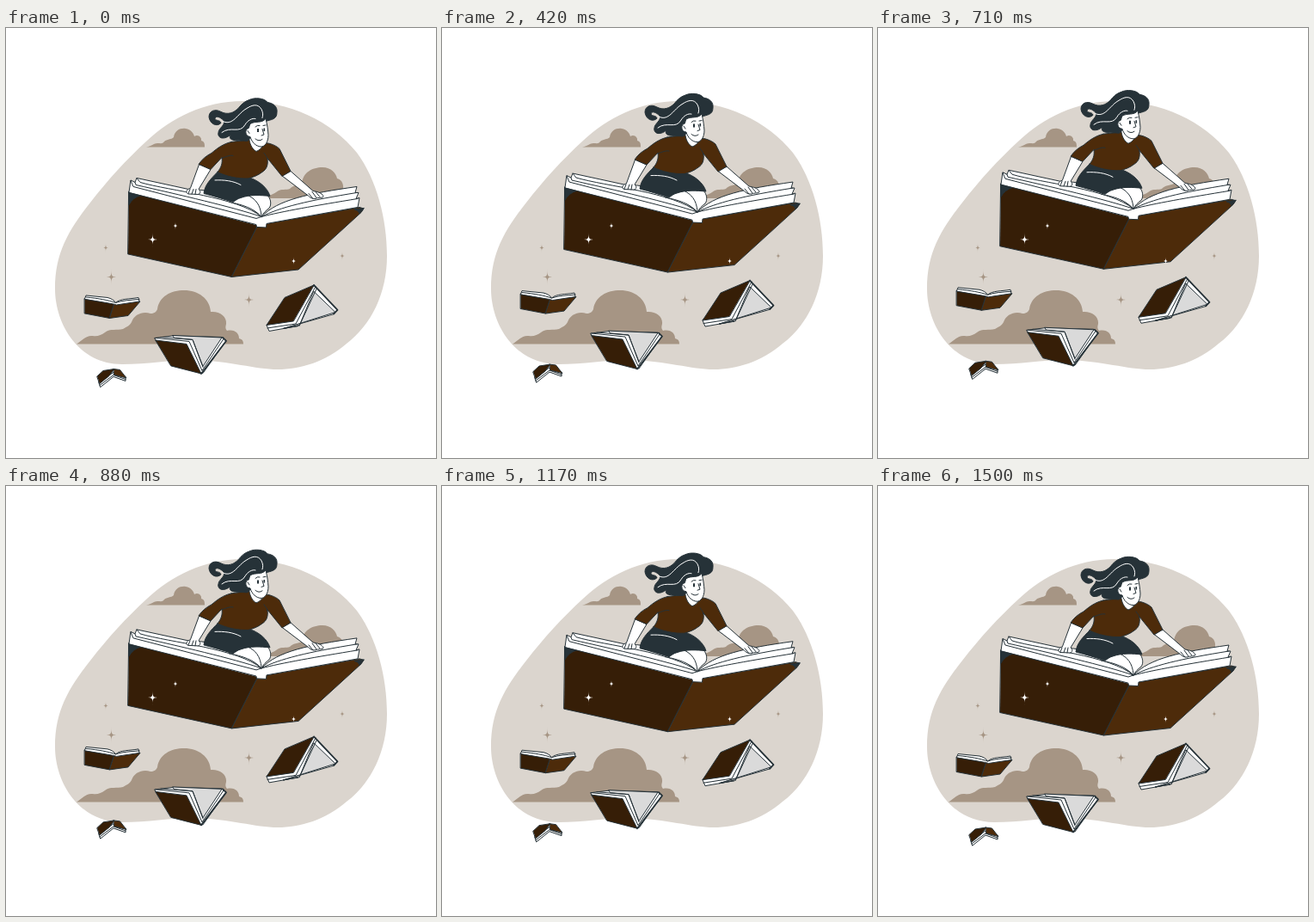
Recreate the animation shown at these times as an HTML page. Size 500 px wide and 500 px high, loop 1540 ms.

```html
<!DOCTYPE html>
<html lang="en">
<head>
<meta charset="utf-8">
<title>Flying books</title>
<style>
  html, body { margin: 0; width: 100%; height: 100%; overflow: hidden; background: #fff; }
  svg { display: block; width: 100%; height: 100%; }
  .cloud { fill: #a69584; }
  .ink { fill: #263238; }
  .line { fill: none; }
  .white { fill: #fff; }
  .cover { fill: #4d2b0a; }
  .shade { fill: #361e07; }
  .grey { fill: #dadada; }
  .edge { fill: none; stroke-width: 1.8; }
  #float { stroke: #263238; stroke-width: 1; stroke-linejoin: round; stroke-linecap: round; }
  .shine { fill: none; stroke: #fff; stroke-width: 1; }
</style>
</head>
<body>
<svg viewBox="0 0 500 500">
  <path fill="#dbd5ce" d="M57 303C57 262 72 236 98 203C118 177 140 153 164 131C192 105 230 85 275 85C330 85 378 108 408 145C431 176 443 222 443 265C443 308 425 345 396 367C372 388 342 397 316 397C290 397 260 387 220 386C190 386 165 391 135 391C85 391 57 345 57 303Z"/>

  <g class="cloud">
    <path d="M163 138.5C170 137 172 134 176 134C180 134 182 135 184 132C187 129 192 130 195 127C196 119 203 116 209 117C215 118 218 122 219 126C223 123 228 127 227 131C231 132 231 135 231 138.5Z"/>
    <path d="M300 198C306 194 310 194 314 191C320 186 326 189 330 187C333 183 340 183 344 181C345 168 356 162 368 162C378 162 384 169 385 175C391 176 394 184 391 190C394 192 394 195 394 198Z"/>
    <path d="M82 367.5C89 363 93 357 101 358C106 359 111 357 115 354C121 349 129 352 136 350C141 347 144 346 146 342C149 333 159 329 168 332C172 332 175 330 176 327C178 312 192 305 207 305C224 305 237 315 238 330C248 329 257 335 256 344C255 348 255 350 257 352C266 350 271 355 271 361C275 362 276 364 276 367.5Z"/>
  </g>
  <g id="dim" class="cloud"></g>

  <g id="float">
    <!-- large open book -->
    <path class="shade" d="M143 191L293 230L262.500 290L142 263.500Z"/>
    <path class="cover" d="M293 230L303 228L411 209L416 210.500L413 215L340 281.500L262.500 290Z"/>
    <path class="ink" d="M143 191L157 195Q147 198 143 206ZM416 210L405 211.500Q410 212 411 216Z"/>
    <path class="white" d="M143 191.500L145 177.500L150 180L152 175L212 188C236 188 270 196 297 220C316 200 352 193 408 185L406 192L410 192L407 199L411 198L409 209L303 228L302.500 232.500L291.500 232L291 229.500Z"/>
    <path class="line" d="M145 178L148 185L291 222L297 220M150 180L151 183C200 194 265 209 297 220M152 175L156 180C190 190 270 197 297 220M297 220C318 209 352 201 408 192M297 220C320 214 360 207 409 199"/>

    <!-- rider -->
    <path class="white" d="M260 203C267 196 286 193 304 195C308 199 309 206 306 210C302 213 299 216 297 220C288 210 275 206 260 203Z"/>
    <path class="line" d="M281 195C290 199 296 206 297 219"/>
    <path class="ink" d="M246 168C256 172 270 174 282 174C294 178 304 186 307 196C296 195 284 194 273 198C269 199 267 201 264 203C252 199 241 196 230 193C231 183 238 176 246 168Z"/>
    <path class="shine" d="M243 177.500C253 177 264 178 273 183"/>
    <path class="white" d="M225 159L238 165L224 188C227 190 226 194 223 194L212 193.500C208 192 210 188 214 187Z"/>
    <path class="line" d="M214 188L212 193M218 188L216 193.500M221 188L220 194"/>
    <path class="white" d="M321 172L331 167L357 190C362 191 367 192 369 196C369 199 363 197 360 199C357 199 355 199 352 196Z"/>
    <path class="line" d="M356 191L361 198M360 191L365 197M352 193L357 199"/>
    <path class="cover" d="M262 133L285 130L302 134C309 135 315 138 318 141L331 167L321 173L304 152C305 160 303 165 298 168C293 172 287 174 282 175.500C269 176 256 173 246 168C250 163 252 158 251 151L238 165L224 159C228 153 233 149 239 146C246 140 253 135 262 133Z"/>
    <path class="line" d="M251 152C256 150 261 148 264 149M304 153C304 150 301 148 300 146"/>
    <path class="white" d="M283 125L302 129C301 135 297 142 291 144C287 142 284 137 283 131Z"/>
    <path class="ink" d="M302 109C308 107 315 107 315 99C316 92 311 88 304 87C301 82 289 81 283 84C277 86 274 89 270 94C265 99 258 102 250 98C243 94 236 97 236 104C237 112 245 116 250 111C249 107 244 109 243 106C244 102 249 104 253 108C256 113 247 117 247 122C246 125 248 128 251 128.500C255 129 258 127 261 125C257 133 272 131 280 132C283 131 284 128 285 125Z"/>
    <path class="white" d="M284 112C290 108 297 112 302 106C304 114 304.500 119 305 125C305 133 301 139 296 138.500C291 138 286 134 284 127C278 127 277 118 282 117Z"/>
    <path class="shine" d="M252 109C264 115 269 100 280 94C286 90 293 88 297 95C299 99 299 102 298 105M251 122C261 114 272 124 278 113C281 108 286 105 290 106"/>
    <path class="line" d="M290 115.500Q292 113 295 114M299 114L302 113.500M298 118L300 124.500L297 125.500M290 129.500Q294 133 298 130M281 120L283 123"/>
    <path class="ink" stroke="none" d="M292 117.500h2v4h-2zM299.500 117h1.600v3.500h-1.600z"/>

    <!-- small open book, left -->
    <path class="shade" d="M91.500 315L126 321L120.500 338L91.500 332.500Z"/>
    <path class="cover" d="M126 321L156 318.500L142 335L120.500 338Z"/>
    <path class="white" d="M91.500 315.500L93 311.500L118 314C122 315 126 317 127.500 320C133 315 143 316 154 314L155 318.500L128.500 322.500L125 321.500Z"/>
    <path class="line" d="M93 313.500C108 315 119 317 127.500 320C136 317 145 317 155 316"/>

    <!-- standing book, right -->
    <path class="white" d="M358 300L385 328L382 333L322 350L340 347L306 353L303 346Z"/>
    <path class="grey" d="M358 307L383 331L323 350L341 346Z"/>
    <path class="shade" d="M358 299.500L324 314L303 346L334 341.500Z"/>
    <path class="line" d="M361 304L341 347M304 349.500L337 344.500L360 301"/>
    <path class="edge" d="M358 299.500L385.500 328.500L381 333"/>

    <!-- tilted book, bottom -->
    <path class="white" d="M173 361L194 358.500L251 360L256 364L229 402L193 393Z"/>
    <path class="grey" d="M194 358L251 360.500L229 394L217 363L196 361Z"/>
    <path class="shade" d="M174 363.500L210 368L227 402.500L192 393.500Z"/>
    <path class="line" d="M174 361L213 365L228 399L253 362M180 360L217 363L229 395"/>
    <path class="edge" d="M227 402.500L256 364.500L252 360.500"/>

    <!-- tiny book -->
    <path class="white" d="M108 412L125 401L139 406L139 411L125 406L110 418Z"/>
    <path class="cover" d="M125 397L132.500 398L140 407.500L126 404Z"/>
    <path class="shade" d="M106 405.500L113 399L126 397L120 405L109 414Z"/>
    <path class="line" d="M109 416L125 404L139 409"/>
  </g>
  <g id="bright" class="white"></g>
</svg>
<script>
  const LOOP = 1540, STEPS = 37, LIFT = 10;
  const float = document.getElementById('float');

  // Four thin points whose sides curve in to the centre.
  function star(x, y, r) {
    const c = `C${x} ${y} ${x} ${y} `;
    const p = document.createElementNS('http://www.w3.org/2000/svg', 'path');
    p.setAttribute('d', `M${x} ${y - r}${c}${x + r} ${y}${c}${x} ${y + r}${c}${x - r} ${y}${c}${x} ${y - r}Z`);
    return p;
  }

  function addStars(id, list) {
    document.getElementById(id).append(...list.map(s => star(...s)));
  }

  addStars('dim', [[116, 255.5, 6.5], [122.5, 289.5, 10], [282.5, 316, 10], [391, 265, 6.5]]);
  addStars('bright', [[170.5, 246, 9.5], [197, 230, 6], [334.5, 271, 6]]);

  // Steady rise and fall at 24 steps per second.
  function draw(ms) {
    const step = Math.floor(((ms % LOOP) + 5) * STEPS / LOOP) % STEPS;
    const y = -LIFT * (1 - Math.abs(1 - 2 * (step + 1) / STEPS));
    float.setAttribute('transform', `translate(0 ${y.toFixed(2)})`);
  }

  const start = performance.now();
  function tick() {
    draw(performance.now() - start);
    requestAnimationFrame(tick);
  }
  draw(0);
  requestAnimationFrame(tick);
</script>
</body>
</html>
```
